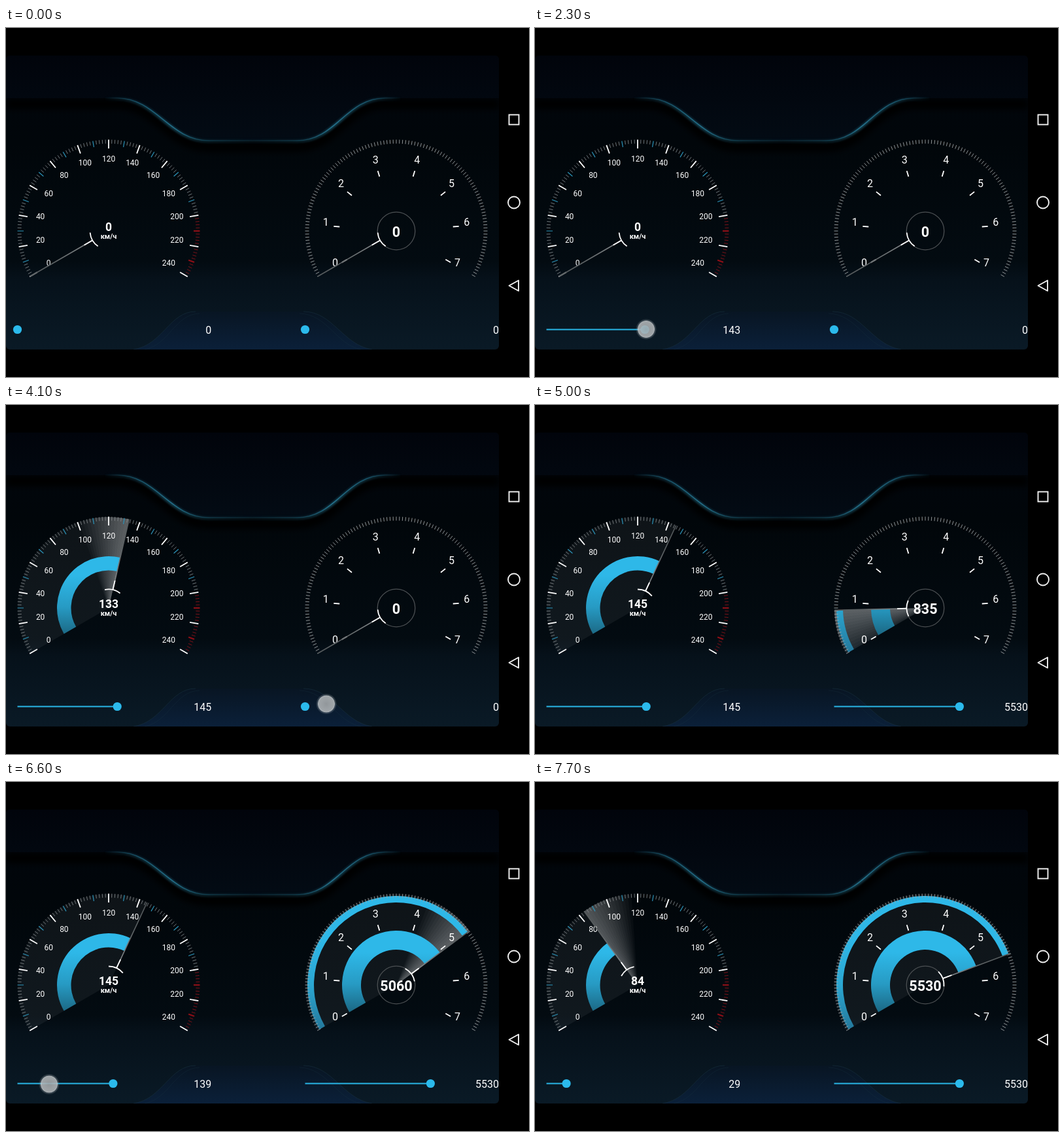
These frames come from a looping animation (800x533 px, 8 s). An HTML page:

```html
<!DOCTYPE html>
<html lang="ru">
<head>
<meta charset="utf-8">
<title>Dashboard gauges</title>
<style>
  html, body { margin: 0; width: 100%; height: 100%; overflow: hidden; background: #000; }
  svg { display: block; width: 800px; height: 533px; }
  text { font-family: Roboto, "Noto Sans", sans-serif; fill: #fff; }
  .mid { text-anchor: middle; }
  .bold { font-weight: 700; }
  .value { font-size: 16px; text-anchor: end; }
  .white { stroke: #fff; stroke-width: 1.8; fill: none; }
  .nav { stroke: #f2f2f2; stroke-width: 1.9; fill: none; }
</style>
</head>
<body>
<svg id="stage" viewBox="0 0 800 533" xmlns="http://www.w3.org/2000/svg">
  <defs>
    <linearGradient id="panel" x2="0" y2="1">
      <stop offset="0" stop-color="#01050c"/>
      <stop offset=".3" stop-color="#01060a"/>
      <stop offset=".7" stop-color="#030b11"/>
      <stop offset=".76" stop-color="#06111a"/>
      <stop offset="1" stop-color="#0a1a26"/>
    </linearGradient>
    <linearGradient id="hood" x2="0" y2="1">
      <stop offset="0" stop-color="#01040b"/>
      <stop offset="1" stop-color="#030b14"/>
    </linearGradient>
    <linearGradient id="rim" gradientUnits="userSpaceOnUse" x1="150" x2="605" y1="0" y2="0">
      <stop offset="0" stop-color="#1d6078" stop-opacity="0"/>
      <stop offset=".12" stop-color="#1d6078" stop-opacity=".8"/>
      <stop offset=".23" stop-color="#257590"/>
      <stop offset=".36" stop-color="#134252" stop-opacity=".7"/>
      <stop offset=".5" stop-color="#0d2d3a" stop-opacity=".6"/>
      <stop offset=".64" stop-color="#134252" stop-opacity=".7"/>
      <stop offset=".77" stop-color="#257590"/>
      <stop offset=".88" stop-color="#1d6078" stop-opacity=".8"/>
      <stop offset="1" stop-color="#1d6078" stop-opacity="0"/>
    </linearGradient>
    <linearGradient id="console" x2="0" y2="1">
      <stop offset="0" stop-color="#081523"/>
      <stop offset="1" stop-color="#0b2039"/>
    </linearGradient>
    <linearGradient id="band" gradientUnits="userSpaceOnUse" x1="0" x2="0" y1="-50" y2="46">
      <stop offset="0" stop-color="#2eb8e8"/>
      <stop offset=".5" stop-color="#279bc4"/>
      <stop offset="1" stop-color="#1a627c"/>
    </linearGradient>
    <linearGradient id="rimBand" gradientUnits="userSpaceOnUse" x1="0" x2="0" y1="-70" y2="70">
      <stop offset="0" stop-color="#2eb8e8"/>
      <stop offset=".5" stop-color="#2ba6d1"/>
      <stop offset="1" stop-color="#24779a"/>
    </linearGradient>
    <radialGradient id="sweep" gradientUnits="userSpaceOnUse" r="139">
      <stop offset=".2" stop-color="#dfe8ec" stop-opacity="0"/>
      <stop offset=".75" stop-color="#dfe8ec" stop-opacity=".055"/>
      <stop offset="1" stop-color="#dfe8ec" stop-opacity=".06"/>
    </radialGradient>
    <radialGradient id="trail" gradientUnits="userSpaceOnUse" r="139">
      <stop offset=".2" stop-color="#fff" stop-opacity=".004"/>
      <stop offset="1" stop-color="#fff" stop-opacity=".027"/>
    </radialGradient>
    <linearGradient id="needle" gradientUnits="userSpaceOnUse" x1="28" x2="139" y1="0" y2="0">
      <stop offset="0" stop-color="#8b8f91"/>
      <stop offset=".6" stop-color="#5d6264"/>
      <stop offset="1" stop-color="#54595b"/>
    </linearGradient>
    <radialGradient id="finger">
      <stop offset="0" stop-color="#a4a8aa" stop-opacity=".88"/>
      <stop offset=".7" stop-color="#b4b8ba" stop-opacity=".88"/>
      <stop offset=".78" stop-color="#d5d8da" stop-opacity=".8"/>
      <stop offset=".83" stop-color="#a0a8ac" stop-opacity=".4"/>
      <stop offset="1" stop-color="#a0a8ac" stop-opacity="0"/>
    </radialGradient>
    <filter id="soft" x="-10%" y="-50%" width="120%" height="200%"><feGaussianBlur stdDeviation="5"/></filter>
    <filter id="glow" x="-10%" y="-50%" width="120%" height="200%"><feGaussianBlur stdDeviation="1.6"/></filter>
    <clipPath id="screen"><rect y="42" width="754" height="449" rx="6"/></clipPath>
    <path id="edge" d="M0 107H170C230 107 250 172 310 172H445C505 172 520 107 580 107H754"/>
  </defs>

  <rect width="800" height="533"/>
  <g clip-path="url(#screen)">
    <rect y="42" width="754" height="449" fill="url(#panel)"/>
    <use href="#edge" y="9" fill="none" stroke="#000" stroke-width="16" filter="url(#soft)"/>
    <path d="M0 42V107H170C230 107 250 172 310 172H445C505 172 520 107 580 107H754V42Z" fill="url(#hood)"/>
    <use href="#edge" y="1" fill="none" stroke="url(#rim)" stroke-width="5" opacity=".5" filter="url(#glow)"/>
    <use href="#edge" fill="none" stroke="url(#rim)" stroke-width="1.5"/>
    <path d="M195 491C240 484 250 433 290 433H455C500 433 515 484 560 491Z" fill="url(#console)"/>
    <path d="M195 491C240 484 250 433 290 433M455 433C500 433 515 484 560 491" fill="none" stroke="#1b3543" stroke-opacity=".5"/>
    <path d="M212 491C250 484 258 437 296 436M449 436C492 437 505 484 543 491" fill="none" stroke="#1b3543" stroke-opacity=".3"/>
    <g id="dials"></g>
    <g id="sliders"></g>
    <circle id="touch" r="16" fill="url(#finger)"/>
  </g>

  <g class="nav">
    <rect x="769.5" y="132.5" width="15" height="15"/>
    <circle cx="777" cy="266.5" r="9"/>
    <path d="M769.5 393.5L784 385.5V401.5Z" stroke-linejoin="round"/>
  </g>
</svg>

<script>
const START = 150, SWEEP = 240, TRAIL = 32, LAYERS = 14;
const byId = id => document.getElementById(id);

function add(parent, tag, attrs = {}, text) {
  const el = document.createElementNS("http://www.w3.org/2000/svg", tag);
  for (const k in attrs) el.setAttribute(k, attrs[k]);
  if (text !== undefined) el.textContent = text;
  parent.append(el);
  return el;
}

function polar(r, deg) {
  const a = deg * Math.PI / 180;
  return [(r * Math.cos(a)).toFixed(2), (r * Math.sin(a)).toFixed(2)];
}

const tick = (r0, r1, deg) => `M${polar(r0, deg)}L${polar(r1, deg)}`;

// Ring sector between two radii and two angles
function sector(r0, r1, a, b) {
  if (b - a < 0.05) return "";
  const big = b - a > 180 ? 1 : 0;
  return `M${polar(r1, a)}A${r1} ${r1} 0 ${big} 1 ${polar(r1, b)}` +
         `L${polar(r0, b)}A${r0} ${r0} 0 ${big} 0 ${polar(r0, a)}Z`;
}

function makeDial(o) {
  const g = add(byId("dials"), "g", { transform: `translate(${o.x} 310)` });
  const wedge = add(g, "path", { fill: "url(#sweep)" });
  const trails = Array.from({ length: LAYERS }, () => add(g, "path", { fill: "url(#trail)" }));
  const bands = o.bands.map(b => ({ ...b, el: add(g, "path", { fill: `url(#${b.fill})` }) }));

  o.ticks(g);
  for (let v = 0; v <= o.max; v += o.step) {
    const [x, y] = polar(o.labelR, START + v / o.max * SWEEP);
    add(g, "text", { x, y, class: "mid", "font-size": o.labelSize }, v / o.unit);
  }

  const hand = add(g, "g");
  add(hand, "path", { d: "M29 0H139", stroke: "url(#needle)", "stroke-width": 1.6 }).setAttribute("d", "M29 0L139 .01");
  add(hand, "path", { d: "M29 0H43", class: "white" });
  add(hand, "path", { d: `M${polar(28.5, -25)}A28.5 28.5 0 0 1 ${polar(28.5, 25)}`, class: "white" });
  const num = add(g, "text", { y: o.numY, class: "mid bold", "font-size": o.numSize });

  return (value, dir) => {
    const end = START + value / o.max * SWEEP;
    wedge.setAttribute("d", sector(0.1, 139, START, end));
    trails.forEach((el, i) => {
      const span = dir * TRAIL * (i + 1) / LAYERS;
      const from = Math.max(START, end - Math.max(span, 0));
      el.setAttribute("d", dir ? sector(0.1, 139, from, end - Math.min(span, 0)) : "");
    });
    bands.forEach(b => b.el.setAttribute("d", sector(b.r0, b.r1, START, end)));
    hand.setAttribute("transform", `rotate(${end})`);
    num.textContent = Math.round(value);
  };
}

function speedTicks(g) {
  const d = { major: "", blue: "", red: "", redMid: "", minor: "" };
  for (let v = 0; v <= 240; v += 2) {
    const a = START + v;
    if (v % 20 === 0) d.major += tick(126, 139.5, a);
    else if (v % 10 === 0) d[v > 200 ? "redMid" : "blue"] += tick(130, 139.5, a);
    else d[v > 200 ? "red" : "minor"] += tick(133.5, 139.5, a);
  }
  const style = {
    minor: ["#8b9092", 0.8], red: ["#7a1219", 1], blue: ["#2b94ba", 1.2],
    redMid: ["#8f0f17", 2], major: ["#fff", 1.8]
  };
  for (const k in style) add(g, "path", { d: d[k], stroke: style[k][0], "stroke-width": style[k][1] });
  add(g, "text", { y: 12, class: "mid bold", "font-size": 11 }, "км/ч");
}

function revTicks(g) {
  let rim = "", marks = "";
  for (let a = 0; a <= SWEEP; a += 2) rim += tick(133.5, 139.5, START + a);
  for (let i = 0; i <= 7; i++) marks += tick(87, 96, START + i * SWEEP / 7);
  add(g, "path", { d: rim, stroke: "#a0a3a4", "stroke-width": 0.9 });
  add(g, "path", { d: marks, class: "white" });
  add(g, "circle", { r: 28.8, fill: "none", stroke: "#4b4f52", "stroke-width": 1.3 });
}

function makeSlider(x, textX, scale) {
  const g = byId("sliders");
  const line = add(g, "path", { stroke: "#29b6e6", "stroke-width": 2 });
  const thumb = add(g, "circle", { cy: 460.5, r: 6.6, fill: "#2bbaec" });
  const label = add(g, "text", { x: textX, y: 466.5, class: "value" });
  return value => {
    const pos = x + value * scale;
    line.setAttribute("d", `M${x} 460.5H${pos}`);
    thumb.setAttribute("cx", pos);
    label.textContent = value;
  };
}

const showSpeed = makeDial({
  x: 157, max: 240, step: 20, unit: 1, labelR: 106, labelSize: 12, numY: 0, numSize: 17.5,
  bands: [{ r0: 57.5, r1: 79, fill: "band" }], ticks: speedTicks
});
const showRevs = makeDial({
  x: 597, max: 7000, step: 1000, unit: 1000, labelR: 108, labelSize: 16, numY: 8.5, numSize: 21.5,
  bands: [{ r0: 54, r1: 83, fill: "band" }, { r0: 126, r1: 136, fill: "rimBand" }], ticks: revTicks
});
const slideLeft = makeSlider(17.5, 314.3, 1.053);
const slideRight = makeSlider(457.5, 754, 0.0347);

// Moments at which the screen refreshes
const ticks = [0, 1400, 1600, 1800, 2100, 2300, 2500, 2800, 3100, 3300, 3500, 3800, 4100, 4500,
  4700, 5000, 5300, 5600, 5800, 6100, 6300, 6600, 6800, 7000, 7200, 7500, 7700];

// Time, left slider, right slider, finger x and y
const drags = [
  [0, 0, 0],
  [1400, 1, 0, 27, 459.5], [1600, 22, 0, 72, 460], [1800, 66, 0, 123, 460],
  [2100, 125, 0, 164, 460], [2300, 143, 0, 170, 460], [2500, 145, 0, 170, 460],
  [2800, 145, 0],
  [4100, 145, 0, 490, 456.5], [4500, 145, 3180, 610, 457], [4700, 145, 5190, 648, 457],
  [5000, 145, 5530],
  [6300, 145, 5530, 166, 461], [6600, 139, 5530, 66, 461.5],
  [6800, 58, 5530, 52, 461.5], [7000, 29, 5530, 51, 461.5],
  [7200, 29, 5530]
];

const clamp = (v, lo, hi) => Math.min(hi, Math.max(lo, v));

function speedAt(t) {
  return clamp((t - 2535) * 0.085, 0, 145) - Math.max(0, t - 6982) * 0.085;
}
const revsAt = t => clamp((t - 4684) * 2.641, 0, 5530);

function direction(f, t) {
  return Math.sign(f(t + 1) - f(t - 1));
}

function draw(t) {
  const [, left, right, x, y] = drags.findLast(d => d[0] <= t);
  showSpeed(speedAt(t), direction(speedAt, t));
  showRevs(revsAt(t), direction(revsAt, t));
  slideLeft(left);
  slideRight(right);
  const touch = byId("touch");
  touch.style.display = x ? "" : "none";
  if (x) touch.setAttribute("transform", `translate(${x} ${y})`);
}

let shown = -1;
function loop() {
  const now = performance.now() % 8000;
  const t = ticks.findLast(v => v <= now);
  if (t !== shown) draw(shown = t);
  requestAnimationFrame(loop);
}
loop();
</script>
</body>
</html>
```
